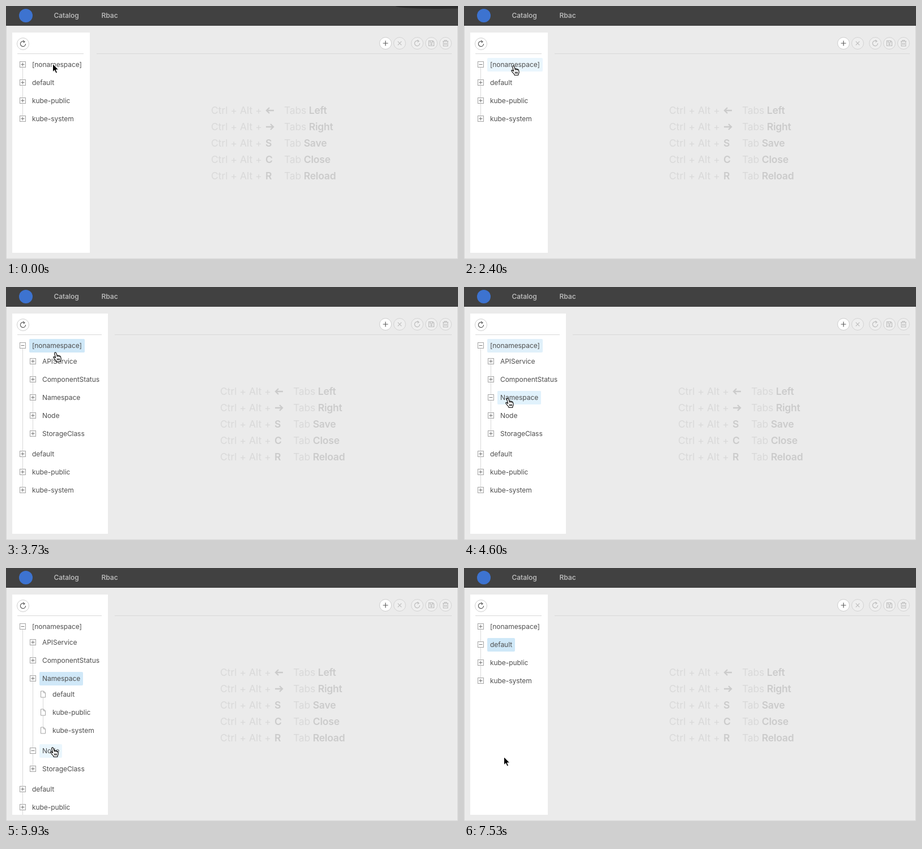
An HTML page for the animation above (8000 ms loop, 798x448 px).

```html
<!DOCTYPE html>
<html lang="en">
<head>
<meta charset="utf-8">
<title>Resource tree</title>
<style>
  html, body { margin: 0; width: 100%; height: 100%; overflow: hidden; background: #ebebeb; }
  svg { display: block; }
  text { font-family: Inter, "Open Sans", sans-serif; }
  .menu { font-size: 12px; font-weight: 500; fill: #c4c4c4; }
  .label { font-size: 12px; letter-spacing: -.06px; fill: #4f4f4f; }
  .hint { font-size: 17.5px; letter-spacing: -.2px; fill: #d9d9d9; }
  .hint .combo { letter-spacing: 0; }
  .hint .strong { font-weight: 600; fill: #cbcbcb; }
  .icon { fill: none; stroke: #5c5c5c; stroke-width: 1.2; }
  .off .icon { stroke: #bdbdbd; }
  .ring { fill: #fff; stroke: #cecece; }
  .off .ring { fill: #efefef; stroke: #d3d3d3; }
  .line { stroke: #d9d9d9; }
  .box { fill: #fff; stroke: #a3a3a3; }
</style>
</head>
<body>
<svg id="stage" width="798" height="448" viewBox="0 0 798 448">
  <rect width="798" height="448" fill="#ebebeb"/>
  <rect width="798" height="35" fill="#414141"/>
  <ellipse id="shade" cx="760" cy="0" rx="72" ry="5" fill="#2c2c2c"/>
  <circle cx="35" cy="17" r="12" fill="#3d73d0"/>
  <text class="menu" x="84.5" y="21">Catalog</text>
  <text class="menu" x="168.5" y="21">Rbac</text>
  <rect id="panel" x="11" y="47" height="390" fill="#fff"/>
  <path id="rules" fill="none" stroke="#d8d8d8"/>
  <g id="buttons"></g>
  <g id="hints"></g>
  <svg id="tree" x="0" y="88" height="349"></svg>
  <path d="M.5 35V447.5H797.5V35" fill="none" stroke="#000" stroke-opacity=".09"/>
  <g id="cursor">
    <path id="arrow" d="M0 0V14.2L3.3 11.2L5.6 16.6L8 15.6L5.8 10.4H10.2Z"
      fill="#000" stroke="#fff" stroke-width="1"/>
    <g id="hand" stroke="#000" stroke-width="1.1" stroke-linejoin="round">
      <path fill="#fff" d="M3.2 1.2Q4.6 .2 5.4 1.8L7 6.2Q8.2 5.2 9.2 6.6Q10.4 5.8 11.4 7.2Q12.8 6.8 13.4 8.4L14.2 12Q14.3 14 13 15.4L12.8 17.5H6.2L5.8 16L2.4 12.2Q.2 9.6 .8 9Q2 8 3.6 9.8L4.6 10.4L2.6 3Q2.4 1.8 3.2 1.2Z"/>
      <path fill="none" d="M7 6.2L7.6 8.6M9.2 6.6L9.7 8.6M11.4 7.2L11.8 9M7.3 11.5L7.7 14.8M9.3 11.5L9.6 14.8M11.2 11.5L11.4 14.8"/>
    </g>
  </g>
</svg>
<script>
const LOOP = 8000, FPS = 15, FADE = 250, OPEN = 250;
const $ = id => document.getElementById(id);

function add(parent, tag, attrs = {}, text) {
  const el = document.createElementNS("http://www.w3.org/2000/svg", tag);
  for (const k in attrs) el.setAttribute(k, attrs[k]);
  if (text) el.textContent = text;
  parent.append(el);
  return el;
}
const set = (el, k, v) => el.setAttribute(k, v);
const show = (el, on) => set(el, "visibility", on ? "visible" : "hidden");
const clamp = v => Math.min(1, Math.max(0, v));
const ease = v => v * v * (3 - 2 * v);
const ramp = (t, from, len) => ease(clamp((t - from) / len));
const pulse = (t, [on, off] = [LOOP, LOOP], len) => ramp(t, on, len) - ramp(t, off, len);
const within = (t, [on, off] = [LOOP, LOOP]) => t >= on && t < off;

// Toolbar
const reload = "M2.8 -3.6A4.6 4.6 0 1 0 4.6 0M.5 -5.8L3 -3.6L.4 -2";
const plus = "M-4.5 0H4.5M0 -4.5V4.5";
const cross = "M-3.3 -3.3L3.3 3.3M3.3 -3.3L-3.3 3.3";
const disk = "M-4.5 -4.5H2.5L4.5 -2.5V4.5H-4.5ZM-2 -4.5V-1.5H2V-4.5M-1.2 1.6A1.2 1.2 0 1 0 1.2 1.6A1.2 1.2 0 1 0 -1.2 1.6";
const bin = "M-5 -3.5H5M-2 -3.5V-5.2H2V-3.5M-3.8 -3.5V5H3.8V-3.5M-1.3 -1V3M1.3 -1V3";

function button(x, y, d, off) {
  const g = add($("buttons"), "g", { transform: `translate(${x} ${y})`, class: off ? "off" : "" });
  add(g, "circle", { r: 10.5, class: "ring" });
  add(g, "path", { d, class: "icon" });
}
button(30, 67, reload);
button(670, 66, plus);
[[695, cross], [726, reload], [751, disk], [776, bin]].forEach(([x, d]) => button(x, 66, d, true));

// Shortcut hints
[["left", "Tabs ", "Left"], ["right", "Tabs ", "Right"], ["S", "Tab ", "Save"],
 ["C", "Tab ", "Close"], ["R", "Tab ", "Reload"]].forEach(([key, noun, verb], i) => {
  const y = 191 + 29 * i;
  const g = add($("hints"), "g", { class: "hint" });
  add(g, "text", { x: 362, y, class: "combo" }, "Ctrl + Alt +");
  if (key.length > 1) {
    const flip = key === "left" ? 1 : -1;
    add(g, "path", { d: "M7 0H-5.5M-1 -5L-6 0L-1 5", transform: `translate(466 ${y - 6}) scale(${flip} 1)`,
      fill: "none", stroke: "#cbcbcb", "stroke-width": 2.3 });
  } else add(g, "text", { x: 458, y, class: "strong" }, key);
  const label = add(g, "text", { x: 491, y }, noun);
  add(label, "tspan", { class: "strong" }, verb);
});

// Tree: width of the highlight, and [start, end] of each state
const leaf = name => ({ name, leaf: true });
const nodes = [
  { name: "[nonamespace]", width: 98, hover: [1800, 3740], picked: [2390, 4500],
    minus: [2390, 7150], open: [2460, 7200], kids: [
      { name: "APIService", width: 71, hover: [3780, 3880] },
      { name: "ComponentStatus", width: 112, hover: [3900, 4020] },
      { name: "Namespace", width: 77, hover: [4050, 5480], picked: [4500, 5910],
        minus: [4520, 5910], open: [4600, 5950],
        kids: ["default", "kube-public", "kube-system"].map(leaf) },
      { name: "Node", width: 40, hover: [5600, 6080], picked: [5930, 7150],
        minus: [5910, 7500], open: [5950, LOOP], kids: [leaf("minikube")] },
      { name: "StorageClass", width: 85 }
    ] },
  { name: "default", width: 49, hover: [6120, 7300], picked: [7140, LOOP + 999], minus: [7150, LOOP] },
  { name: "kube-public", width: 78 },
  { name: "kube-system", width: 83 }
];

function build(list, parent, depth) {
  const x = 29.5 + 18 * depth;
  list.forEach((n, i) => {
    n.g = add(parent, "g");
    if (i < list.length - 1) n.line = add(n.g, "line", { x1: x, x2: x, y1: 5, class: "line" });
    if (n.leaf) {
      add(n.g, "path", { class: "box", transform: `translate(${x} -.5)`,
        d: "M-4 -5.5H1L4 -2.5V5.5H-4ZM1 -5.5V-2.5H4" });
    } else {
      const bg = { x: x + 11.5, y: -12, width: n.width, height: 24, rx: 2 };
      n.warm = add(n.g, "rect", { ...bg, fill: "#eaf6fd" });
      n.sel = add(n.g, "rect", { ...bg, fill: "#cfe8f8" });
      add(n.g, "rect", { x: x - 5, y: -5.5, width: 10, height: 10, class: "box" });
      add(n.g, "path", { d: `M${x - 3} -.5h6`, class: "icon", style: "stroke:#777;stroke-width:1" });
      n.bar = add(n.g, "path", { d: `M${x} -3.5v6`, style: "stroke:#777" });
    }
    add(n.g, "text", { x: x + 16.5, y: 4, class: "label" }, n.name);
    if (n.kids) {
      n.block = add(n.g, "svg", { x: 0, y: 12, width: 300 });
      build(n.kids, n.block, depth + 1);
    }
  });
}
build(nodes, $("tree"), 0);

// Places the rows and returns the height of the list
function layout(list, t) {
  let y = 16;
  for (const n of list) {
    let step = 32;
    if (n.kids) {
      const p = pulse(t, n.open, OPEN), h = p * layout(n.kids, t);
      set(n.block, "height", h);
      set(n.block, "opacity", p);
      step += h;
    }
    if (!n.leaf) {
      set(n.warm, "opacity", pulse(t, n.hover, FADE));
      set(n.sel, "opacity", pulse(t, n.picked, FADE));
      set(n.bar, "opacity", within(t, n.minus) ? 0 : 1);
    }
    if (n.line) set(n.line, "y2", step - 6);
    set(n.g, "transform", `translate(0 ${y})`);
    y += step;
  }
  return y - 16;
}

// Pointer moves: start, end, then the place reached
const start = [83, 105];
const moves = [[3660, 3735, 83, 115], [3735, 4270, 73, 196], [5380, 5760, 78, 317], [6320, 6660, 67, 333]];

function pointer(t) {
  let [x, y] = start;
  for (const [from, to, mx, my] of moves) {
    const p = ramp(t, from, to - from);
    x += (mx - x) * p;
    y += (my - y) * p;
  }
  return [x, y];
}

function draw(t) {
  const wide = within(t, [2460, 7460]);
  const dx = wide ? 32 : 0;
  set($("panel"), "width", 137 + dx);
  set($("tree"), "width", 148 + dx);
  set($("rules"), "d", `M20 84.5H${137 + dx}M${160 + dx} 84.5H787`);
  set($("hints"), "transform", `translate(${dx / 2} 0)`);
  set($("shade"), "opacity", 1 - ramp(t, 270, 400));
  layout(nodes, t);

  const hand = within(t, [1860, 7400]);
  const [x, y] = hand ? pointer(t) : t < 4000 ? [82.5, 102.5] : [70.5, 334.5];
  set($("cursor"), "transform", `translate(${x} ${y})`);
  show($("hand"), hand);
  show($("arrow"), !hand);
}

const began = performance.now();
function tick() {
  const t = (performance.now() - began) % LOOP;
  draw(Math.floor((t + 5) * FPS / 1000) * 1000 / FPS);
  requestAnimationFrame(tick);
}
tick();
</script>
</body>
</html>
```
